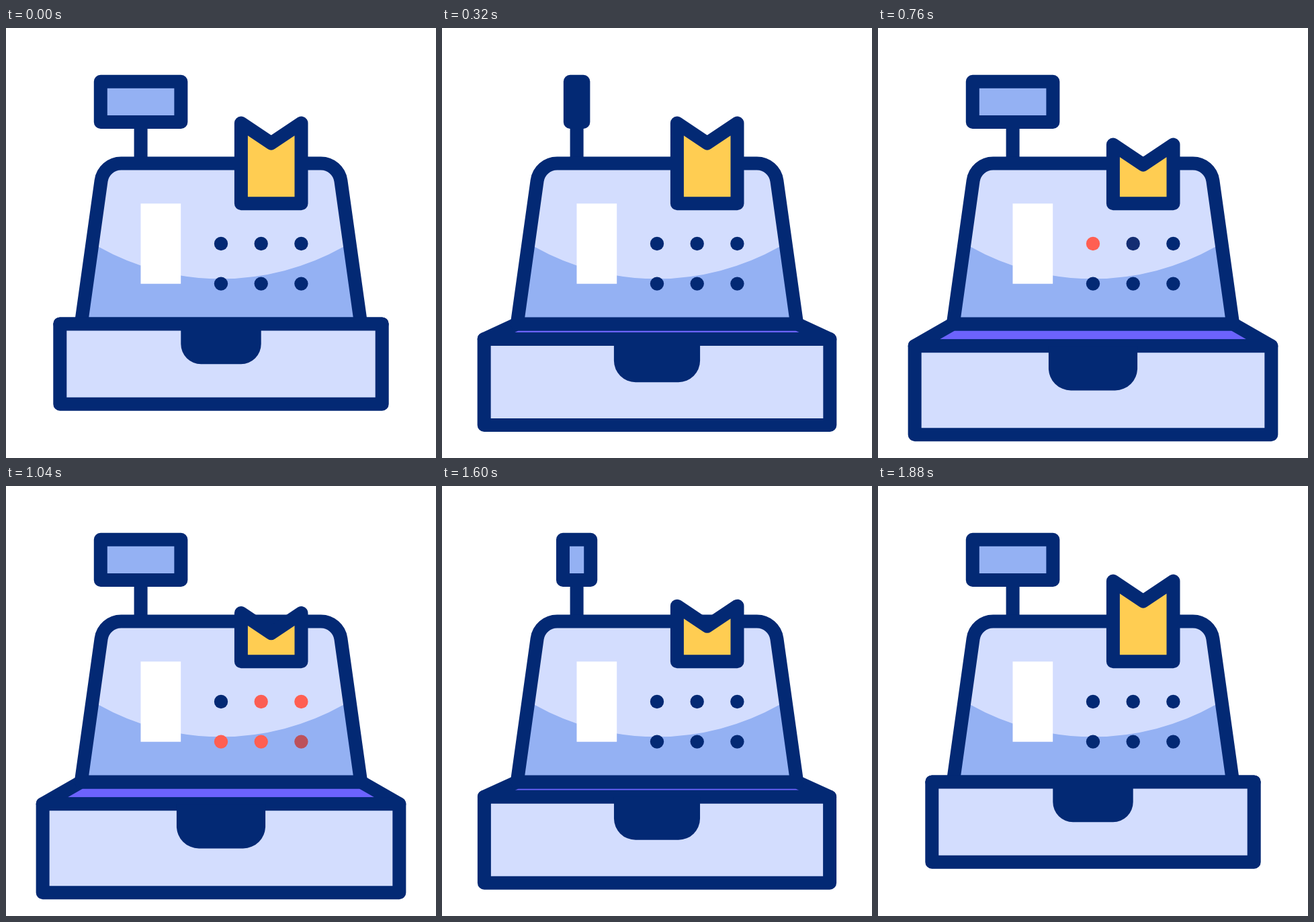
An HTML page that plays this animation: 640 px wide and 640 px high, repeating every 2 s.

```html
<!DOCTYPE html>
<html lang="en">
<head>
<meta charset="utf-8">
<title>Cash register</title>
<style>
  html, body { margin: 0; width: 100%; height: 100%; overflow: hidden; background: #fff; }
  svg { display: block; width: 100%; height: 100%; }
  .line { stroke: #032974; stroke-width: 20; stroke-linejoin: round; }
  .navy { fill: #032974; }
  .pale { fill: #d3ddfe; }
  .blue { fill: #94b1f3; }
</style>
</head>
<body>
<svg viewBox="0 0 640 640">
  <path class="line" d="M200.6 140V201" fill="none"/>
  <path id="display" class="line blue"/>
  <path id="lid" class="line" fill="#6c63fc"/>
  <path class="pale" d="M111.8 440.4L141.6 227.3A30 30 0 0 1 171.3 201.5H468.7A30 30 0 0 1 498.4 227.3L528.2 440.4Z"/>
  <path class="blue" d="M127.7 320L137.5 325.5A372.4 372.4 0 0 0 502.5 325.5L512.3 320L528.2 440.4H111.8Z"/>
  <rect x="200.5" y="261.3" width="59.7" height="119.4" fill="#fff"/>
  <path class="line" fill="none" d="M111.8 440.4L141.6 227.3A30 30 0 0 1 171.3 201.5H468.7A30 30 0 0 1 498.4 227.3L528.2 440.4Z"/>
  <path id="drawer" class="line pale"/>
  <path id="handle" class="navy"/>
  <path id="ribbon" class="line" fill="#ffcd52"/>
  <g id="keys"></g>
</svg>
<script>
const LOOP = 2000;
const NAVY = [3, 41, 116], RED = [255, 95, 82];
const $ = id => document.getElementById(id);
const draw = (id, d) => $(id).setAttribute("d", d);
const mix = (a, b, p) => a + (b - a) * p;

const linear = (t, from, to) => Math.min(1, Math.max(0, (t - from) / (to - from)));
const ease = (t, from, to) => {
  const x = linear(t, from, to);
  return x * x * (3 - 2 * x);
};
const box = (cx, half, top, bottom) =>
  `M${cx - half} ${top}H${cx + half}V${bottom}H${cx - half}Z`;

const keys = Array.from({ length: 6 }, (_, i) => {
  const key = document.createElementNS("http://www.w3.org/2000/svg", "circle");
  key.setAttribute("cx", 320 + (i % 3) * 59.7);
  key.setAttribute("cy", 321 + Math.floor(i / 3) * 59.6);
  key.setAttribute("r", 10.2);
  $("keys").append(key);
  return key;
});

// The sign narrows to an edge and widens again.
function drawDisplay(t) {
  const flip = (from, to) => {
    const mid = (from + to) / 2;
    return 1 - ease(t, from, mid) + ease(t, mid, to);
  };
  const width = flip(120, 440) * flip(1480, 1880);
  draw("display", box(200.6, 59.8 * width, 79.8, 139.9));
}

function drawDrawer(t) {
  const open = ease(t, 120, 440) - ease(t, 1480, 1800);
  const scale = 1 + 0.107 * open;
  const top = 440.4 + 32.8 * open;
  const half = 239.7 * scale;
  const grip = 59.7 * scale, r = 30 * scale, end = top + 59.8 * scale;
  draw("lid", `M111.8 440.4H528.2L${320 + half} ${top}H${320 - half}Z`);
  draw("drawer", box(320, half, top, mix(559.8, 605.2, open)));
  draw("handle", `M${320 - grip} ${top}V${end - r}a${r} ${r} 0 0 0 ${r} ${r}` +
    `H${320 + grip - r}a${r} ${r} 0 0 0 ${r} ${-r}V${top}Z`);
}

function drawRibbon(t) {
  const drop = 47.6 * (ease(t, 440, 960) - ease(t, 1480, 1880));
  const top = 141.5 + drop;
  draw("ribbon", `M349.9 ${top}L394.7 ${top + 30}L439.5 ${top}V261.2H349.9Z`);
}

function drawKeys(t) {
  keys.forEach((key, i) => {
    const local = t - i * 60;
    const glow = linear(local, 697, 757) - linear(local, 980, 1040);
    key.setAttribute("fill", `rgb(${NAVY.map((c, k) => Math.round(mix(c, RED[k], glow)))})`);
  });
}

function render(t) {
  drawDisplay(t);
  drawDrawer(t);
  drawRibbon(t);
  drawKeys(t);
}

const start = performance.now();
function tick() {
  render((performance.now() - start) % LOOP);
  requestAnimationFrame(tick);
}
tick();
</script>
</body>
</html>
```
